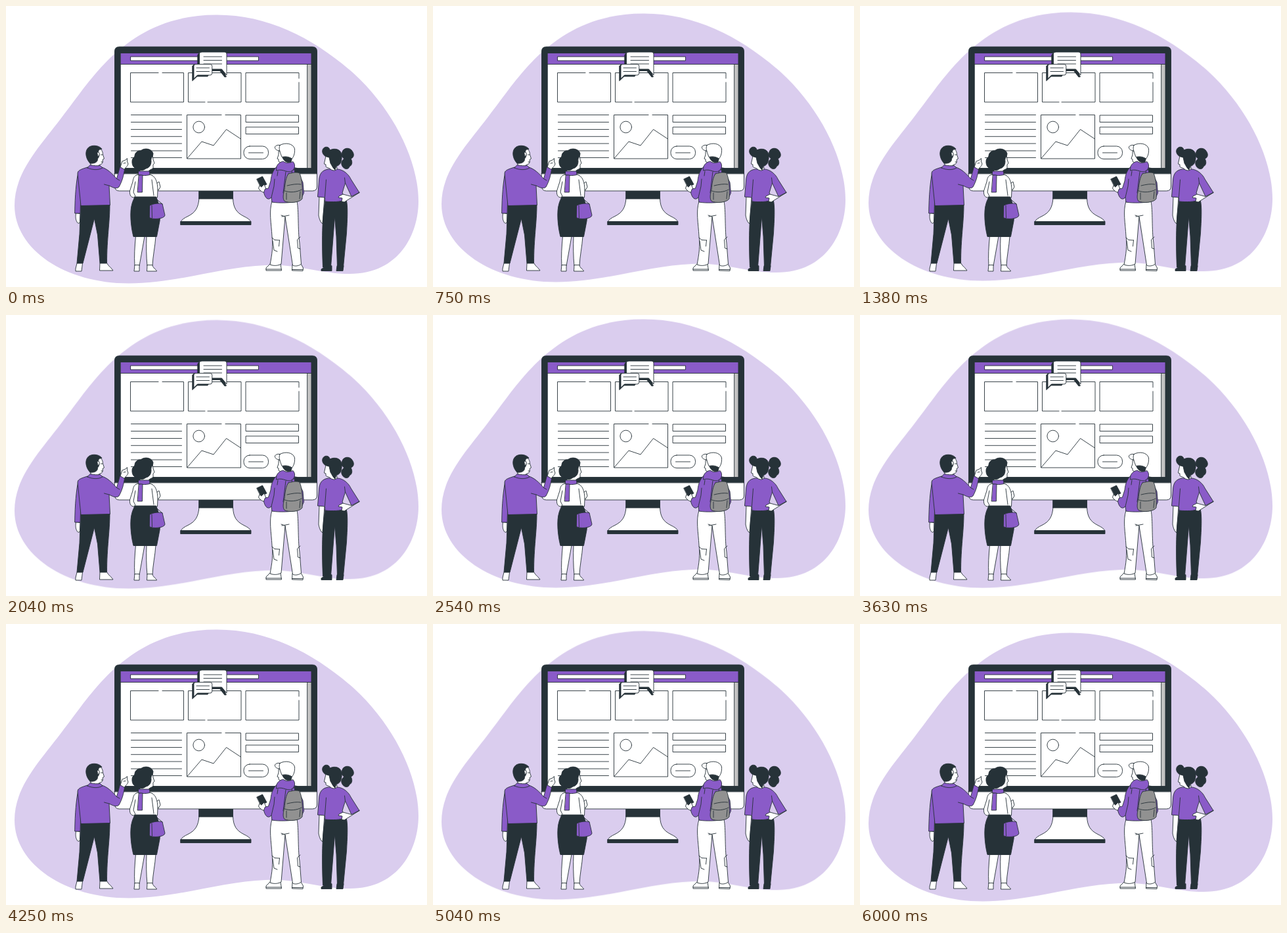
An HTML page that plays this animation: 641x427 px, repeating every 6.04 s.

```html
<!DOCTYPE html>
<html lang="en">
<head>
<meta charset="utf-8">
<title>Team in front of a web page</title>
<style>
html, body { margin: 0; width: 100%; height: 100%; overflow: hidden; background: #fff; }
svg { display: block; width: 641px; height: 427px; }
path, rect, circle { stroke: #263238; stroke-width: .9; stroke-linejoin: round; stroke-linecap: round; }
#blob { fill: #dacdee; stroke: none; }
.w { fill: #fff; }
.p { fill: #8a5bc8; }
.d { fill: #263238; }
.g { fill: #919191; }
.s { fill: #c2c2c2; }
.n { fill: none; }
</style>
</head>
<body>
<svg viewBox="0 0 641 427">
  <path id="blob" d="M320 13.5C400 13 470 50 530 103C590 158 628 235 628 297C628 345 600 407 523 407C480 407 440 391 395 394C330 396 260 421.5 187 421.5C90 421.5 13 370 13 303C13 250 55 210 88 165C130 112 185 13.5 320 13.5Z"/>

  <g id="monitor">
    <path class="w" d="M294 292H345.500C346 307 351 314 362 319.500C367 322 371 324 373 328H266C268 324 272 322 277 319.500C288 314 293 307 294 292Z"/>
    <rect class="d" x="294" y="280" width="51.500" height="13"/>
    <rect class="d" x="266" y="327.500" width="107" height="5"/>
    <path class="w" d="M165.500 254H473.500V274Q473.500 281 466.500 281H172.500Q165.500 281 165.500 274Z"/>
    <path class="d" d="M165.500 254.500V69Q165.500 62 172.500 62H466.500Q473.500 62 473.500 69V254.500Z"/>
    <rect class="w" x="174.500" y="71.500" width="290.500" height="175"/>
    <rect class="s" x="459" y="88.500" width="6" height="158"/>
    <rect class="p" x="174.500" y="71.500" width="290.500" height="17"/>
    <rect class="w" x="190" y="77" width="194.500" height="6"/>
  </g>

  <g id="page" class="n">
    <path d="M232 101.500H189.500V146H270.500V101.500H238"/>
    <path d="M303 146H277.500V101.500H358V146H307"/>
    <path d="M446 110V101.500H365V146H446V116"/>
    <path d="M190.500 165.500H267.500M190.500 176.500H267.500M190.500 187.500H267.500M190.500 198.300H267.500M190.500 209H267.500M190.500 220H267.500M190.500 230.500H267.500"/>
    <path d="M328 165.500H275.500V232H357.500V165.500H334"/>
    <circle cx="293.700" cy="184" r="8.800"/>
    <path d="M276 231.500L298 206L316 212L335.500 187.500L357.500 202"/>
    <rect x="365.500" y="166" width="80" height="10.500"/>
    <rect x="365.500" y="184" width="80" height="10.500"/>
    <rect x="362" y="213" width="37.500" height="19.500" rx="9"/>
    <path d="M369.500 223H391.500"/>
  </g>

  <g id="chat">
    <path class="d" d="M292 74L295.500 70H334V105L335.500 107.500L333 108L325.500 98.500H292Z"/>
    <path class="w" d="M297 70H333Q336 70 336 73V105L328.500 96H297Q294.500 96 294.500 93V73Q294.500 70 297 70Z"/>
    <path class="n" d="M301 77H328.500M301 82.500H328.500M301 88H328.500"/>
    <path class="d" d="M284 91L287.500 88V104H309L307 107H291L284 113.500Z"/>
    <path class="w" d="M288.500 88.500H311Q313.800 88.500 313.800 91.500V102Q313.800 105 311 105H291.500L286 110.500V91.500Q286 88.500 288.500 88.500Z"/>
    <path class="n" d="M290 94H309.500M290 99.500H309.500"/>
  </g>

  <g id="man">
    <path class="w" d="M106.500 315C105.500 321 106 327 110 330.500L112.500 329L113 316Z"/>
    <path class="w" d="M174 245L177 236L182 234L184.500 231.500L184.500 236L186 240C185 244 182 245 180 248.500Z"/>
    <path class="n" d="M179 239L182 238.500"/>
    <path class="w" d="M108 391L106 399V403H115L116.500 391Z"/>
    <path class="w" d="M143 391L142.500 402H163C161 398 156 396 153.500 390.500Z"/>
    <path class="d" d="M114 303L158 302C158 330 153.500 352 153.500 391H143L139.500 348L134.500 323L117 391H108L112 347Z"/>
    <path class="p" d="M110 252C107 267 105 287 104.700 315H113L114 280Z"/>
    <path class="p" d="M124 245C115 248 110 249 109 254L114 303.500L158.500 302.500L157 273C163 276 168 278.500 172 275C177 266 179 258 180.500 248.500L173.500 244.500L168.500 262.500C161 254 155 248 146 245Z"/>
    <path class="n" d="M157 273L149.500 271M173 265L168.500 262.500"/>
    <path class="w" d="M140 215C146 217 147.500 222 147.500 226L149.500 232L147.500 233L147 238C146 241 142 241 141 242L140 246H129V235Z"/>
    <path class="d" d="M128 239C121 232 119 219 127 214C133 210.500 143 212.500 146 217.500C143 217.500 141 218.500 140.500 221L142 226C142 229 140.500 231 139.500 232C140 237 135 240 128 239Z"/>
    <path class="w" d="M139 223C141 220.500 143.500 224 141.500 227L140 229Z"/>
    <path class="n" d="M144.500 226H147M145 237H147"/>
    <path class="p" d="M124 246L128 241.500C134 243 140 243 143.500 242.500L147 246C140 250 131 249 124 246Z"/>
  </g>

  <g id="woman">
    <path class="w" d="M230 269L233 267L235 275L232 280L230 278Z"/>
    <path class="w" d="M197.500 350H211L203 395H196C195 380 196 365 197.500 350ZM214 350H228C227 366 223.500 380 223 395H215C213.500 380 213.500 366 214 350Z"/>
    <path class="w" d="M196 394L195 403H203L203 394ZM215 394L214.500 403H229.500C228 399 224 399 223 394Z"/>
    <path class="w" d="M202 256C195 257 194 261 193 267L188.500 281C188 287 190 291 195 291H230.500L231 280C231 268 228 258 219 256Z"/>
    <path class="n" d="M197 267L194 283L197 289M222 264L225 288"/>
    <path class="d" d="M196 290H228.500C233 300 236 312 234 327L229.500 350.500H194C190 335 188 312 192 300C193 296 195 293 196 290Z"/>
    <path class="p" d="M219 303C225 300 232 299.500 238 300.500L242 318C241 324 222 325 218.500 321.500Z"/>
    <path class="n" d="M222 303L222.500 322M225 290L238 301"/>
    <path class="w" d="M218 223L223 225L224 233L226 239L224 241L224 246C222 249 218 248 217 252H204V242Z"/>
    <path class="d" d="M205 220C211 214.500 222 217 224 224C224 229 220 231 221 236C221 242 218 246 213 247C208 251 204 250 201 247C195 248 191.500 242 192 236C192 231 195 231 196 228C196 223 201 219 205 220Z"/>
    <path class="p" d="M202 251H218.500L219 256.500C213 258 208 258 201.500 256.500Z"/>
    <path class="p" d="M202.500 257H208L207.500 283H200.500Z"/>
  </g>

  <g id="hiker">
    <path class="w" d="M402 392L396 398V402H419.500L418 392ZM436 393L435.500 402L452 402.500L452.500 398L448.500 391Z"/>
    <path class="n" d="M396 400H419.500M435.500 400.500H452"/>
    <path class="w" d="M405 297H443C446 310 444 340 447 360L449.500 392C446 395 440 396 436.500 394L425 320L419 392C414 395 407 395 402 393C405 378 407 363 405 350C404 330 400 312 405 297Z"/>
    <path class="n" d="M420 320L431 318M405 352L409 355.500L416.500 356M406 357L408 371L413 373M416.500 356L415.500 365M448 351L443.500 355L444.500 368L448 369M419 318L424.500 320"/>
    <path class="d" d="M382 263L390.500 259L397 271L388 275Z"/>
    <path class="w" d="M386 273L384.500 277C386 280 390 283 394 284L396 278L393 271L389 275Z"/>
    <path class="p" d="M416 241C407 247 404 256 403 266L399.500 277L394.500 278L392.500 283C394 290 397 294 401 293L404 291L405 298C416 300 435 299 444 297L446 258C445 250 440 245 436 241Z"/>
    <path class="n" d="M409 263L408 274L404 291M414 251L413 258M426 252L422 284"/>
    <path class="d" d="M439 247L443 246L446 256L441 257Z"/>
    <path class="p" d="M447 258L452 268L453.500 284L450 292Z"/>
    <path class="g" d="M430 255C436 253 443 252 447 254C451 263 452 278 451 293C447 299 430 300 424 296.500C421 293 422 286 424 279C425 270 426 260 430 255Z"/>
    <path class="n" d="M428 273C436 271 443 270 449 271M424.500 281C432 284 443 283 450 279M427 284V294M448 282L447 293M435 254L436 249L441 249L442 253"/>
    <path class="w" d="M415 219L415 226L413 232L415 233L415 236C418 239 420 237 421 240H433V226Z"/>
    <path class="d" d="M420 227C425 226 431 228 435.500 231L434 237C428 239 422 236 420 227Z"/>
    <path class="p" d="M412 244C414 239 418 237 422 236C427 240 433 238 437 236.500C441 241 440 247 436 250C430 256 422 246 412 250Z"/>
    <path class="w" d="M417 211.500C425 207 437 208.500 439.500 217C440 224 438 229 435.500 232C430 228.500 425 228.500 420 229.500L416.500 220C412 219.500 409 217.500 409.500 214C411 211.500 414 211 417 211.500Z"/>
    <path class="n" d="M417 211.500C415.500 215 416 218 417 221"/>
  </g>

  <g id="ponytail">
    <path class="w" d="M477 289L476 318C477 324 479 329 482 331L483 318L485 290Z"/>
    <path class="d" d="M486 396L480 400V402.500H496V395ZM504 395L503 402.500H513L514 395Z"/>
    <path class="d" d="M486 296L518 294C521 305 519.500 326 518.500 345L513.500 397H504.500L503 350L500.500 320L494.500 397H482.500C481 360 481 320 486 296Z"/>
    <path class="p" d="M491 248C481 249 477 255 476.500 266L474.500 290L485.500 291L486 297C497 298 508 298 518 294.500L512 284L516.500 269L526 289.500L538 283.500L525 263C522 256 514 249 506 248Z"/>
    <path class="w" d="M526 289.500L513 286L507 289L506 291L512 292L511 297L515 298L538 283.500Z"/>
    <path class="n" d="M487.500 264L485.500 290M516.500 269L515.500 261"/>
    <path class="w" d="M487 228L485 237L484.500 240L487 241L487 244C489 247 492 245 494 248C498 251 502 250 504 248L503 235Z"/>
    <path class="d" d="M493 219C501 215 510 218 511 226C512 235 509 243 503 243L501 249C498 247 496 242 494 239L492 230L488 229C481 227 479 217 486 214.500C490 213.500 493 216 493 219Z"/>
    <path class="d" d="M512 222C513 215 524 214 527.500 221C531 226 529 231 525 232C528 237 527 242 523 244C521 250 513 248 511 241C510 237 512 234 515 232C511 230 510 226 512 222Z"/>
  </g>
</svg>
<script>
const lift = 8.5;
const loop = 6040;
document.getElementById("blob").animate(
  [0, -lift, 0].map(y => ({ transform: `translateY(${y}px)` })),
  { duration: loop, iterations: Infinity, easing: "linear" }
);
</script>
</body>
</html>
```
